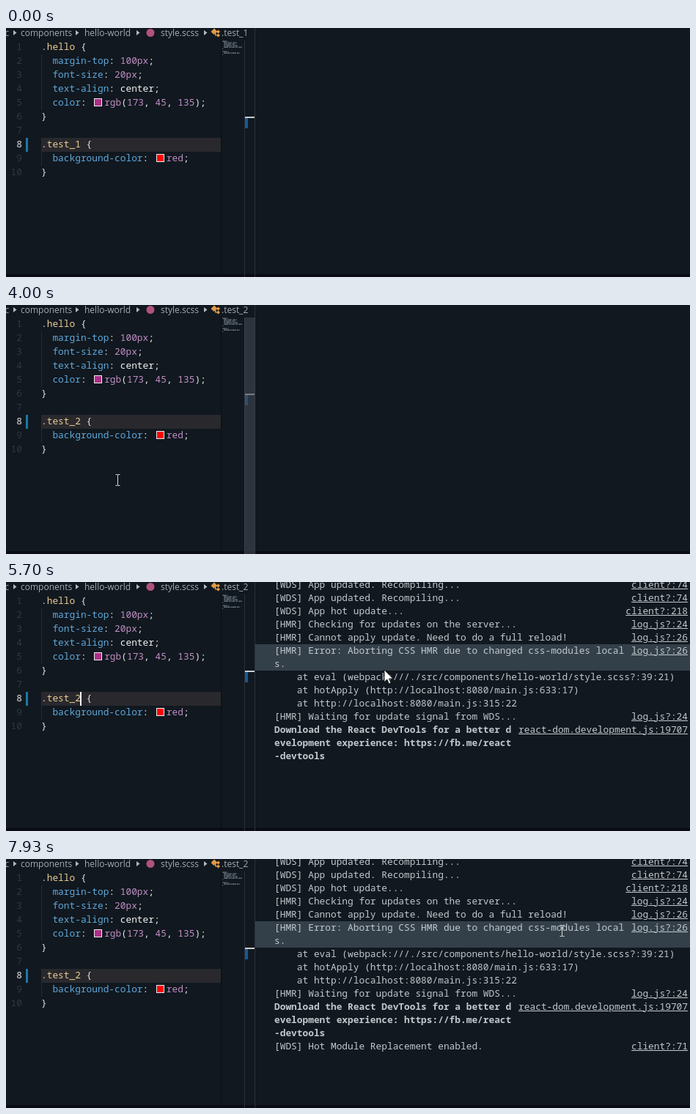
These frames come from a looping animation (933 px wide and 340 px high, 8000 ms). An HTML page with a canvas:

```html
<!DOCTYPE html>
<html lang="en">
<head>
<meta charset="utf-8">
<title>Stylesheet hot reload</title>
<style>
  html, body { margin: 0; width: 100%; height: 100%; overflow: hidden; background: #11181f; }
  #stage {
    position: relative; width: 933px; height: 340px; overflow: hidden; background: #11181f;
    font: 12.83px/19px "Noto Sans Mono", monospace; white-space: pre; color: #e2e5e7;
    font-variant-ligatures: none;
  }
  #stage > * { position: absolute; }
  .anim { animation: 8s linear infinite; }
  .hard { animation: 8s step-end infinite; }

  /* breadcrumb */
  #crumbs { left: 0; top: 0; width: 339px; height: 17px; color: #a4abb2; font: 12px/17px "Open Sans", sans-serif; }
  #crumbs span { position: absolute; top: -2px; }
  #crumbs svg { position: absolute; left: 0; top: 0; }

  /* editor */
  #active { left: 48px; top: 150px; width: 245px; height: 19px; background: #29292d; }
  #changed { left: 27px; top: 150px; width: 3px; height: 19px; background: #1b77a8; }
  .guide { left: 48px; width: 1px; background: #242c34; }
  #code { left: 48px; top: 16px; }
  #code div { position: relative; height: 19px; }
  #code .num { position: absolute; left: -48px; width: 22px; text-align: right; color: #2e3943; }
  #code .num.on { color: #e2e5e7; }
  .s { color: #e9cc95; }
  .p { color: #5fa9dc; }
  .n { color: #bf8fc4; }
  .w { color: #f2f3f3; }
  .swatch { display: inline-block; box-sizing: border-box; width: 11px; height: 11px; margin: 0 3.2px 0 2.7px; border: 1px solid #eee; vertical-align: -1px; }
  .two { position: absolute; left: 46.2px; }
  .brace { display: inline-block; animation-name: brace; }
  .one { animation-name: one; }
  .two { animation-name: two; }
  #caret { left: 101px; top: 150px; width: 2px; height: 19px; background: #f3f3f3; animation-name: caret; }
  #shade { left: 293px; top: 17px; width: 2px; height: 319px; background: linear-gradient(90deg, #0a0e13, #11181f); }
  #map { left: 295px; top: 17px; }
  #ruler { left: 325px; top: 17px; width: 13px; height: 323px; border: solid #2a3139; border-width: 0 1px; }
  #edge { left: 339px; top: 0; width: 1px; height: 340px; background: #2a3139; }
  #here { left: 326px; top: 121px; width: 13px; height: 2px; background: #c9cccd; }
  #diff { left: 326px; top: 123px; width: 4px; height: 14px; background: #165a98; }
  #slider { left: 325px; top: 17px; width: 15px; height: 323px; background: rgba(66, 70, 84, .6); animation-name: slider; }
  #bottom { left: 0; top: 336px; width: 933px; height: 4px; background: #0b0b13; }

  /* console */
  #log { left: 340px; top: -6px; width: 593px; line-height: 18px; color: #c2c8cd; }
  #log div { position: relative; padding-left: 26px; }
  #log a { position: absolute; right: 3px; top: 0; text-decoration: underline; font-weight: 400; }
  #log .b { font-weight: 700; }
  #hover { left: 340px; top: 0; width: 593px; background: #33404a; animation-name: hover; }
  .t1 { animation-name: t1; } .t2 { animation-name: t2; } .t3 { animation-name: t3; }
  .t4 { animation-name: t4; } .t5 { animation-name: t5; } .t6 { animation-name: t6; }
  .t7 { animation-name: t7; }

  /* pointer */
  #pointer { left: 0; top: 0; animation-name: move; }
  #pointer svg { position: absolute; overflow: visible; left: 0; top: 0; }
  #beam { animation-name: beam; }
  #arrow { animation-name: arrow; }

  @keyframes one { 0% { opacity: 1 } 29.75%, 100% { opacity: 0 } }
  @keyframes two { 0% { opacity: 0 } 31.6%, 100% { opacity: 1 } }
  @keyframes brace { 0% { transform: none } 29.75% { transform: translateX(-7.7px) } 31.6%, 100% { transform: none } }
  @keyframes crumb1 { 0% { opacity: 1 } 35.5%, 100% { opacity: 0 } }
  @keyframes crumb2 { 0% { opacity: 0 } 35.5%, 100% { opacity: 1 } }
  @keyframes caret {
    0% { opacity: 0; transform: none }
    11.37% { opacity: 1 }
    18.1% { opacity: 0 }
    24.75% { opacity: 1; transform: none }
    29.75% { opacity: 1; transform: translateX(-8px) }
    31.6% { opacity: 1; transform: none }
    37.35%, 50%, 62.35%, 74.85%, 87.35%, 99.1%, 100% { opacity: 0; transform: none }
    43.1%, 55.85%, 68.35%, 81%, 93.5% { opacity: 1; transform: none }
  }
  @keyframes slider { 0%, 2.6% { opacity: 0 } 4.4%, 59.5% { opacity: 1 } 65.5%, 100% { opacity: 0 } }
  @keyframes t1 { 0% { opacity: 0 } 55%, 100% { opacity: 1 } }
  @keyframes t2 { 0% { opacity: 0 } 56.7%, 100% { opacity: 1 } }
  @keyframes t3 { 0% { opacity: 0 } 58.6%, 100% { opacity: 1 } }
  @keyframes t4 { 0% { opacity: 0 } 59.6%, 100% { opacity: 1 } }
  @keyframes t5 { 0% { opacity: 0 } 61.4%, 100% { opacity: 1 } }
  @keyframes t6 { 0% { opacity: 0 } 63.7%, 100% { opacity: 1 } }
  @keyframes t7 { 0% { opacity: 0 } 74%, 100% { opacity: 1 } }
  @keyframes hover {
    0% { opacity: 0; top: 193px; height: 54px }
    68.35% { opacity: 1; top: 193px; height: 54px }
    70.4% { opacity: 1; top: 139px; height: 18px }
    71.2%, 100% { opacity: 1; top: 85px; height: 36px }
  }
  @keyframes move {
    0%, 2.6% { transform: translate(18px, 300px) }
    11.37% { transform: translate(100px, 158px) }
    13.25% { transform: translate(92px, 156px) }
    18.1%, 57.6% { transform: translate(152px, 239px) }
    58.6% { transform: translate(294px, 232px) }
    63.75%, 68.3% { transform: translate(637px, 214px) }
    69.3%, 70.3% { transform: translate(635px, 195px) }
    71.25%, 72.1% { transform: translate(516px, 120px) }
    78%, 79.9% { transform: translate(423px, 103px) }
    81.87% { transform: translate(458px, 102px) }
    89.5% { transform: translate(590px, 102px) }
    90.5% { transform: translate(608px, 98px) }
    99.12%, 100% { transform: translate(758px, 98px) }
  }
  @keyframes beam {
    0% { opacity: 0 } 2.6% { opacity: 1 } 58% { opacity: 0 } 68.35% { opacity: 1 }
    70.7% { opacity: 0 } 75%, 100% { opacity: 1 }
  }
  @keyframes arrow {
    0% { opacity: 0 } 58% { opacity: 1 } 68.35% { opacity: 0 }
    70.7% { opacity: 1 } 75%, 100% { opacity: 0 }
  }
</style>
</head>
<body>
<div id="stage">
  <div id="crumbs"><svg width="339" height="17">
      <g fill="#b4b9be"><path id="sep" d="M10 3l4.5 3.500-4.500 3.500z"/><use href="#sep" x="85"/><use href="#sep" x="168"/><use href="#sep" x="260"/></g>
      <circle cx="197" cy="6.5" r="5.5" fill="#b0527c"/>
      <g fill="#e39a45"><path d="M284 .5l4 4-4.5 4.5-4-4z"/><path d="M289.5 2.5l2.5 2.5-2.5 2.5-2.5-2.5zM289.5 7.5l2.5 2.5-2.5 2.5-2.5-2.5z"/><path d="M285 5h4v1h-2.5v3.5h2v1h-3.5z"/></g>
    </svg><span style="left:-1.5px">c</span><span style="left:20px">components</span><span style="left:107px">hello-world</span><span style="left:211px">style.scss</span><span class="hard" style="left:294px;animation-name:crumb1">.test_1</span><span class="hard" style="left:294px;animation-name:crumb2">.test_2</span></div>

  <div id="active"></div>
  <div id="changed"></div>
  <div class="guide" style="top:36px;height:76px"></div>
  <div class="guide" style="top:169px;height:19px"></div>
  <div id="code"><div><span class="s">.hello</span> {</div><div>  <span class="p">margin-top</span>: <span class="n">100px</span>;</div><div>  <span class="p">font-size</span>: <span class="n">20px</span>;</div><div>  <span class="p">text-align</span>: <span class="w">center</span>;</div><div>  <span class="p">color</span>: <i class="swatch" style="background:#ad2d87"></i><span class="n">rgb</span>(<span class="n">173</span>, <span class="n">45</span>, <span class="n">135</span>);</div><div>}</div><div></div><div><span class="s">.test_<span class="one hard">1</span><span class="two hard">2</span></span><span class="brace hard"> {</span></div><div>  <span class="p">background-color</span>: <i class="swatch" style="background:#f00"></i><span class="n">red</span>;</div><div>}</div></div>
  <div id="caret" class="hard"></div>

  <div id="shade"></div>
  <canvas id="map" width="30" height="22"></canvas>
  <div id="bottom"></div>
  <div id="ruler"></div>
  <div id="edge"></div>
  <div id="diff"></div>
  <div id="here"></div>
  <div id="slider" class="anim"></div>

  <div id="hover" class="hard"></div>
  <div id="log"><div class="hard t1">[WDS] App updated. Recompiling...<a>client?:74</a></div><div class="hard t2">[WDS] App updated. Recompiling...<a>client?:74</a></div><div class="hard t3">[WDS] App hot update...<a>client?:218</a></div><div class="hard t3">[HMR] Checking for updates on the server...<a>log.js?:24</a></div><div class="hard t4">[HMR] Cannot apply update. Need to do a full reload!<a>log.js?:26</a></div><div class="hard t4">[HMR] Error: Aborting CSS HMR due to changed css-modules local
s.
    at eval (webpack:///./src/components/hello-world/style.scss?:39:21)
    at hotApply (http://localhost:8080/main.js:633:17)
    at http://localhost:8080/main.js:315:22<a>log.js?:26</a></div><div class="hard t5">[HMR] Waiting for update signal from WDS...<a>log.js?:24</a></div><div class="hard t6 b">Download the React DevTools for a better d
evelopment experience: https://fb.me/react
-devtools<a>react-dom.development.js:19707</a></div><div class="hard t7">[WDS] Hot Module Replacement enabled.<a>client?:71</a></div></div>

  <div id="pointer" class="anim">
    <svg id="beam" class="hard" width="1" height="1"><path d="M-2.5-7.5h2.500l.5.5.5-.5h2.500M-2.500 7.500h2.500l.5-.5.5.5h2.500M.5-7v14" fill="none" stroke="#dcdcd6"/></svg>
    <svg id="arrow" class="hard" width="1" height="1"><path d="M0 0v16.5l3.8-3.6 2.6 6 2.5-1.1-2.6-5.8h5.4z" fill="#fff" stroke="#111" stroke-width=".8"/></svg>
  </div>
</div>
<script>
  // Line numbers, and a minimap with one small mark per character.
  const map = document.getElementById('map').getContext('2d');
  const lines = [...document.querySelectorAll('#code > div')];
  map.fillStyle = '#aebccb';
  lines.forEach((line, row) => {
    const text = line.textContent.replace('12 {', '1 {');
    [...text].forEach((ch, col) => {
      if (ch === ' ') return;
      map.globalAlpha = .28 + (ch.charCodeAt(0) * 7 % 10) / 28;
      map.fillRect(col, row * 2 + 1, 1, 1);
      map.globalAlpha /= 2;
      map.fillRect(col, row * 2, 1, 1);
    });
    const num = document.createElement('span');
    num.className = row === 7 ? 'num on' : 'num';
    num.textContent = row + 1;
    line.prepend(num);
  });
</script>
</body>
</html>
```
